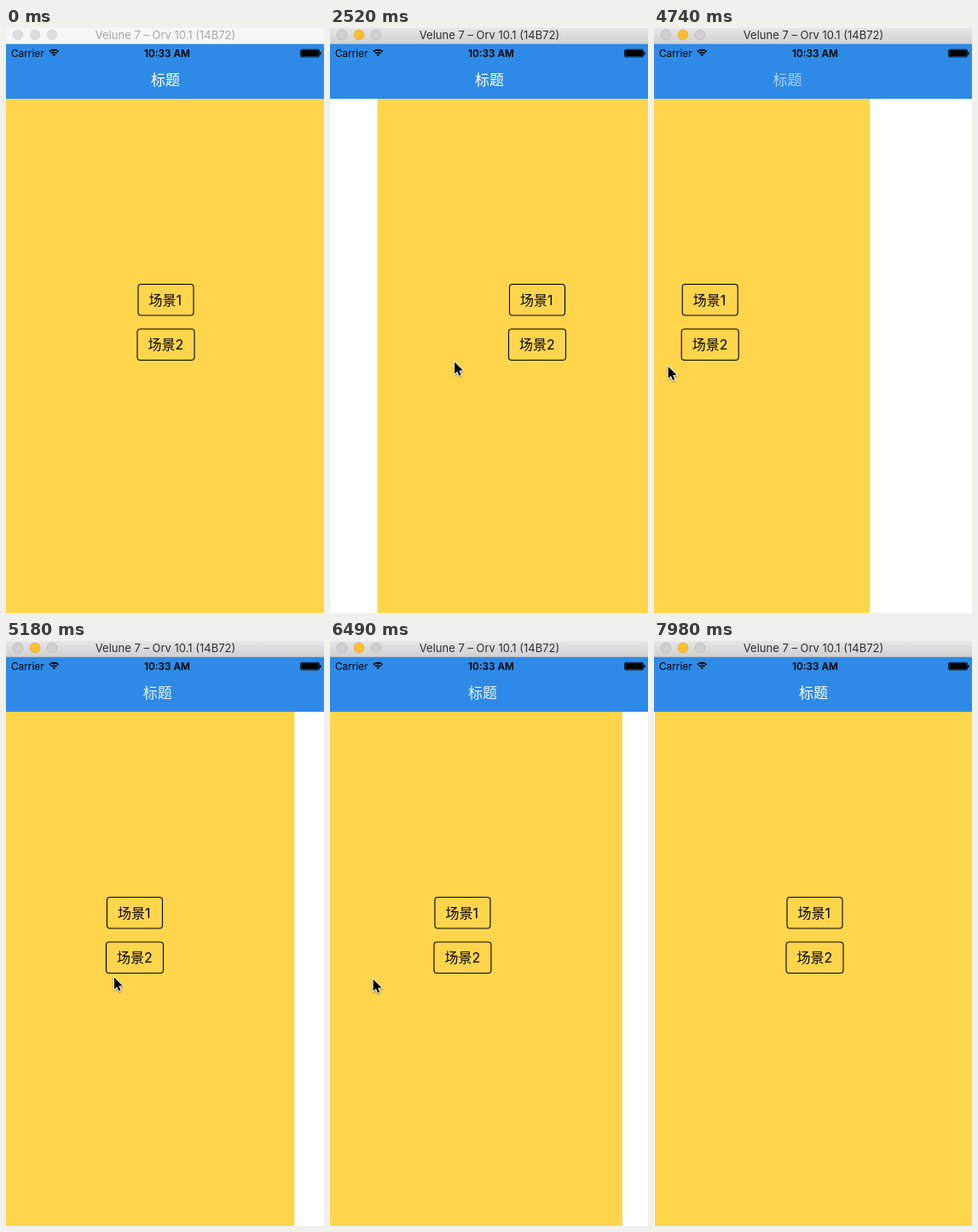
An HTML page with a canvas that plays this animation: 373x686 px, repeating every 8.88 s.

```html
<!DOCTYPE html>
<html lang="zh-CN">
<head>
<meta charset="utf-8">
<style>
html, body { margin: 0; width: 100%; height: 100%; overflow: hidden; background: #fff; }
canvas { display: block; width: 373px; height: 686px; }
</style>
</head>
<body>
<canvas id="stage" width="373" height="686"></canvas>
<script>
const ctx = document.getElementById('stage').getContext('2d');
const W = 373, H = 686, PAGE_W = 375, LOOP = 8880;
const FONT = 'Inter, "Noto Sans CJK SC", "Noto Sans CJK", sans-serif';

// The page follows the pointer at half speed and springs home when let go.
const GAIN = 0.475, SPRING = 0.012, GLIDE = 450;
const APPEAR = 1500, FOCUS = 2230;
const ENTER = { x: 222, y: 404 }, EXIT = { x: 390, y: 414 };
const DRAGS = [
  { down: 2090, reach: 3015, up: 4050, from: { x: 28.5, y: 380 }, to: { x: 288, y: 404 } },
  { down: 4380, reach: 4735, up: 4970, from: { x: 273, y: 400 }, to: { x: 16, y: 396 } },
  { down: 5440, reach: 6212, up: 6280, from: { x: 273, y: 390 }, to: { x: 27, y: 395 } },
  { down: 6640, reach: 7174, up: 7400, from: { x: 63, y: 396 }, to: { x: 300, y: 410 } }
];

// The picture advances in beats, with a rest before 4000 ms.
function beat(t) {
  if (t < 4000) return 1500 + 146 * Math.min(11, Math.floor((t - 1492) / 146));
  return 4000 + 146.7 * Math.floor((t - 3996) / 146.7);
}

function glide(a, b, t, start, end) {
  const s = Math.max(0, Math.min(1, (t - start) / (end - start)));
  const p = s * s * (3 - 2 * s);
  return { x: a.x + (b.x - a.x) * p, y: a.y + (b.y - a.y) * p };
}

function pointer(t) {
  let place = ENTER, since = APPEAR;
  for (const d of DRAGS) {
    if (t < d.down) return glide(place, d.from, t, since, Math.min(d.down, since + GLIDE));
    if (t < d.up) return glide(d.from, d.to, t, d.down, d.reach);
    place = d.to;
    since = d.up;
  }
  return glide(place, EXIT, t, since, since + GLIDE);
}

function pageOffset(t) {
  let sum = 0;
  for (const d of DRAGS) {
    if (t < d.down) break;
    const x = glide(d.from, d.to, t, d.down, d.reach).x;
    const k = SPRING * Math.max(0, t - d.up);
    sum += GAIN * (x - d.from.x) * (1 + k) * Math.exp(-k);
  }
  return Math.abs(sum) < 0.4 ? 0 : sum;
}

function text(str, x, y, size, color, align = 'left', weight = 400) {
  ctx.font = `${weight} ${size}px ${FONT}`;
  ctx.textAlign = align;
  ctx.textBaseline = 'alphabetic';
  ctx.fillStyle = color;
  ctx.fillText(str, x, y);
}

function rect(x, y, w, h, color) {
  ctx.fillStyle = color;
  ctx.fillRect(x, y, w, h);
}

function box(x, y, w, h, r) {
  ctx.beginPath();
  ctx.roundRect(x, y, w, h, r);
}

function stroke(color, width) {
  ctx.strokeStyle = color;
  ctx.lineWidth = width;
  ctx.stroke();
}

function light(x, fill, edge) {
  ctx.beginPath();
  ctx.arc(x, 8, 5.8, 0, Math.PI * 2);
  ctx.fillStyle = fill;
  ctx.fill();
  stroke(edge, 0.8);
}

function windowBar(active) {
  let fill = '#f6f6f6';
  if (active) {
    fill = ctx.createLinearGradient(0, 0, 0, 18);
    fill.addColorStop(0, '#e6e6e6');
    fill.addColorStop(1, '#d1d1d1');
  }
  rect(0, 0, W, 18, fill);
  rect(0, 18, W, 1, active ? '#b4bcc6' : '#d5dbe2');
  for (const x of [14, 34, 54]) {
    if (!active) light(x, '#dcdcdc', '#d2d2d2');
    else if (x === 34) light(x, '#ffbf2f', '#e3a52c');
    else light(x, '#cfcfcf', '#b6b6b6');
  }
  text('Velune 7 – Orv 10.1 (14B72)', 187, 13, 13, active ? '#303030' : '#a6a6a6', 'center');
}

function wifi(x, y) {
  const fan = r => ctx.arc(x, y, r, -Math.PI * 0.75, -Math.PI * 0.25);
  for (const r of [4.6, 7.6]) {
    ctx.beginPath();
    fan(r);
    stroke('#000', 1.7);
  }
  ctx.beginPath();
  ctx.moveTo(x, y);
  fan(2.6);
  ctx.fillStyle = '#000';
  ctx.fill();
}

function header(offset) {
  rect(0, 19, W, 64, '#2e8ae6');
  text('Carrier', 6, 33.6, 11.8, '#000');
  wifi(56.3, 33.2);
  text('10:33 AM', 189, 33.6, 11.8, '#000', 'center', 600);
  box(345.5, 25.2, 22, 8.8, 1.5);
  stroke('#000', 0.8);
  rect(346.3, 26, 20.4, 7.2, '#000');
  box(368, 28, 1.6, 3.6, 0.8);
  ctx.fill();

  const left = Math.min(0, offset);
  ctx.globalAlpha = 1 + left * 1.2 / W;
  text('标题', 187 + left / 4, 67, 17, '#fff', 'center');
  ctx.globalAlpha = 1;
}

function button(label, x, y, w) {
  box(x, y, w, 36.5, 3.5);
  stroke('#000', 1.1);
  text(label, x + 12.5, y + 24.2, 16, '#000');
}

function page(offset) {
  rect(0, 83, W, H - 83, '#fff');
  ctx.save();
  ctx.translate(offset, 0);
  rect(0, 83, PAGE_W, H - 83, '#ffd54b');
  button('场景1', 155, 300.5, 65);
  button('场景2', 154, 353, 67);
  ctx.restore();
}

function cursor({ x, y }) {
  ctx.save();
  ctx.translate(x + 0.7, y + 1);
  ctx.beginPath();
  ctx.moveTo(0, 0);
  for (const [px, py] of [[0, 13.8], [3.2, 10.9], [5.4, 16], [7.6, 15.1], [5.4, 10], [9.8, 9.8]]) {
    ctx.lineTo(px, py);
  }
  ctx.closePath();
  ctx.shadowColor = 'rgba(0,0,0,.4)';
  ctx.shadowBlur = 2;
  ctx.shadowOffsetY = 1;
  stroke('#fff', 1.8);
  ctx.shadowColor = 'transparent';
  ctx.fillStyle = '#000';
  ctx.fill();
  ctx.restore();
}

function draw(time) {
  const t = beat(time), offset = pageOffset(t);
  ctx.clearRect(0, 0, W, H);
  page(offset);
  header(offset);
  windowBar(t >= FOCUS);
  if (t >= APPEAR) cursor(pointer(t));
}

const start = performance.now();
function tick() {
  draw((performance.now() - start) % LOOP);
  requestAnimationFrame(tick);
}
tick();
</script>
</body>
</html>
```
